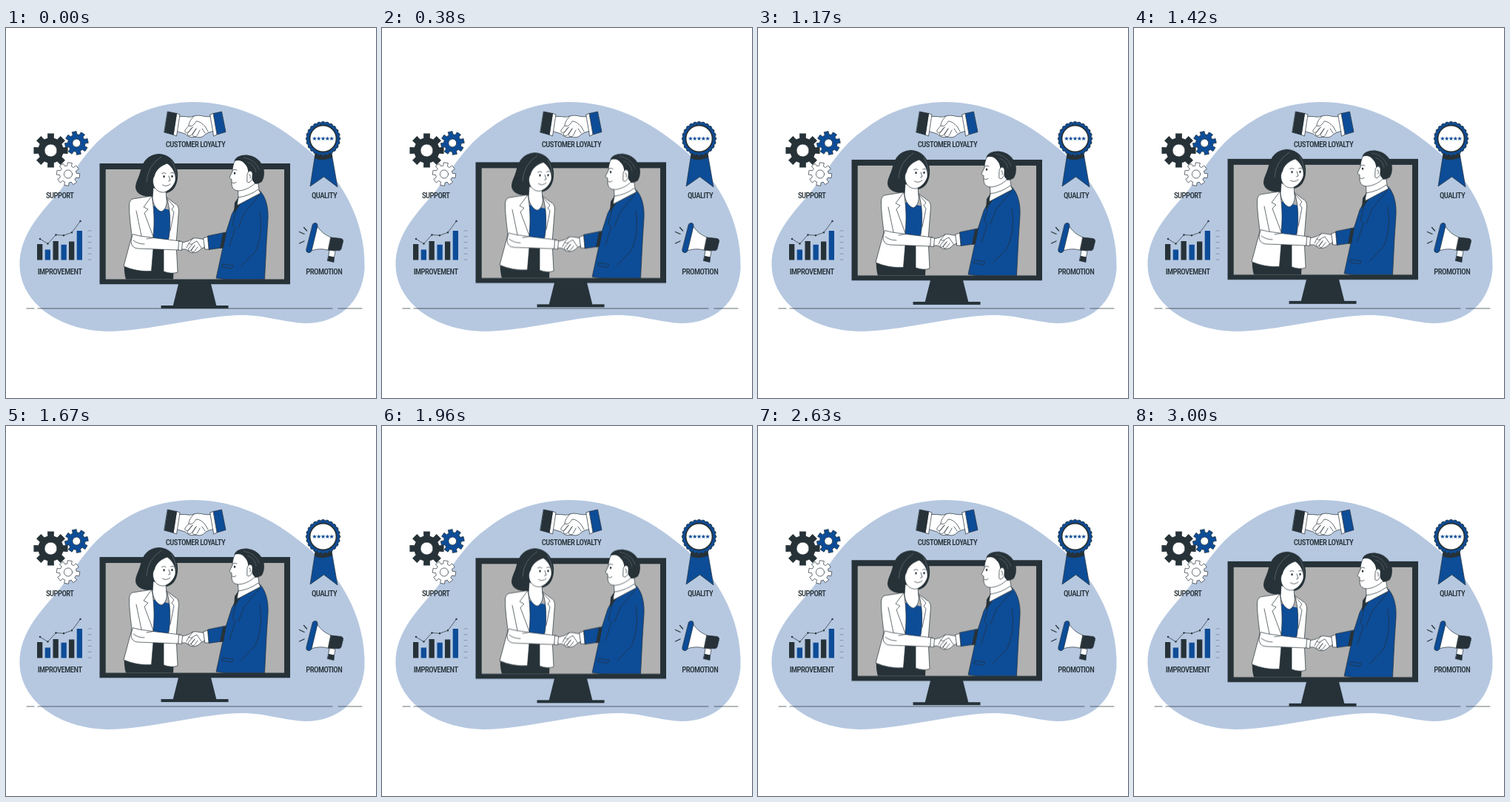
An HTML page that plays this animation: 500 px wide and 500 px high, repeating every 3040 ms.

```html
<!DOCTYPE html>
<html lang="en">
<head>
<meta charset="utf-8">
<title>Customer loyalty</title>
<style>
  html, body { margin: 0; width: 100%; height: 100%; overflow: hidden; background: #fff; }
  svg { display: block; width: 100vw; height: 100vh; }
  text {
    font: 500 10.6px "Roboto Condensed", "Liberation Sans Narrow", "Open Sans Condensed", Roboto, sans-serif;
    font-stretch: condensed;
    letter-spacing: -.5px;
    text-anchor: middle;
    fill: #263238;
  }
  .dark { fill: #263238; }
  .blue { fill: #0d4c97; }
  .white { fill: #fff; }
  .ink { stroke: #263238; stroke-width: .7; stroke-linecap: round; stroke-linejoin: round; }
  .line { fill: none; }
  .dot { stroke-width: 2.4; }
  .float { animation: float 3040ms linear infinite; }
  @keyframes float { 50% { transform: translateY(-6.6px); } }
</style>
</head>
<body>
<svg viewBox="0 0 500 500">
  <path fill="#b6c8e0" d="M252 100C310 100 360 124 405 162C450 198 487 258 484.500 326C481 372 448 399 405 399C375 398 352 388 318 388C270 388 190 410 138 410C70 409 20 370 18.500 322C17 276 53 245 75 217C96 189 112 159 144 137C176 112 210 101 252 100Z"/>
  <path class="ink line" d="M28 379H38M43 379H441M449 379H481"/>

  <!-- Gears are filled in by the script -->
  <g id="gears"></g>

  <!-- Chart -->
  <path class="dark" d="M42 292h7.300v21.500h-7.300zM63.500 288h7.300v25.500h-7.300zM85 288.500h7.300v25h-7.300z"/>
  <path class="blue" d="M52.700 299.500h7.300v14h-7.300zM74.500 292.800h7.300v20.700h-7.300zM95.700 274h7.300v39.500h-7.300z"/>
  <path class="ink line" d="M46 285L56.500 291.500L67.500 279.500L78 280.300L89 276.300L100.500 261"/>
  <path class="ink line dot" d="M46 285h0M56.500 291.500h0M67.500 279.500h0M78 280.300h0M89 276.300h0M100.500 261h0"/>
  <path fill="none" stroke="#7c8790" stroke-width=".8" d="M110.500 274h5M110.500 281.800h5M110.500 289.600h5M110.500 297.400h5M110.500 305.200h5M110.500 313h5"/>

  <!-- Small handshake -->
  <g class="ink">
    <path class="white" d="M233 120C242 118 248 122 254 119C263 116 270 122 278 119L283 139C277 140 273 141 269 144C265 149 259 148 255 147C250 149 245 146 242 143L229 139Z"/>
    <path class="line" d="M254 119C250 123 247 128 247 132C251 134 255 130 257 126C262 126 265 129 269 133L273 140M247 132L242 138C241 141 244 143 247 140L252 134M252 134L245 143C245 146 249 147 252 143L257 136M257 136L252 144C253 148 257 148 259 144L262 138M265 136L269 142"/>
    <path class="dark" d="M218.500 113L231 115.500L226.500 144.500L214 141Z"/>
    <path class="white" d="M231 115.500L235 117L230.500 146L226.500 144.500Z"/>
    <path class="blue" d="M280 115.500L291.500 113L297 140.500L285 144Z"/>
    <path class="white" d="M276 117L280 115.500L285 144L281 146Z"/>
  </g>

  <!-- Award -->
  <path class="blue ink" d="M418 169L411 214L429.500 201L448 215L440 169Z"/>
  <path class="dark" d="M418 169L417 176Q429 181 441 175L440 169Z"/>
  <g id="badge" transform="translate(428.500 149.500)"></g>

  <!-- Megaphone -->
  <g class="ink">
    <path class="white" d="M437.500 300L445 301.500L443.500 310L436 308.500Z"/>
    <path class="dark" d="M436 308.500L443.500 310L443 316.500L434.500 314.500Z"/>
    <path class="white" d="M419 265C424 275 432 280 439.500 283L436 300.500C428 298 419 298 410 302Z"/>
    <path class="dark" d="M439 283L453 284.500Q456 285.500 455.500 288.500L453 298.500Q452 301 449 300.800L435.500 300Z"/>
    <path class="blue" d="M414.500 265Q416 263 419 263.500Q421.500 264.500 421 268L413 301Q411.500 304.500 408 303.500Q405 302.500 405.800 299Z"/>
    <path class="line" stroke-width="1.300" d="M402.500 269.500L406.500 274M396.500 275.500L403 278.500M396.500 291L403 288"/>
  </g>

  <text x="256" y="160.900">CUSTOMER LOYALTY</text>
  <text x="72.700" y="230.200">SUPPORT</text>
  <text x="430" y="230.200">QUALITY</text>
  <text x="72.700" y="332.700">IMPROVEMENT</text>
  <text x="429.800" y="332.700">PROMOTION</text>

  <g class="float">
    <!-- Monitor -->
    <path class="dark" d="M126.500 182.900H384V346.300H126.500ZM233 346H277L284.500 376H225.500ZM209.500 374.900H300.500V379H209.500Z"/>
    <path fill="#b1b1b1" d="M134.700 191H376V339.600H134.700Z"/>

    <!-- Woman -->
    <path class="dark" d="M160 318L198 296L228 296L226 339.600H162Q159 330 160 318Z"/>
    <path class="blue" d="M197 240L222 246L222 288H199Z"/>
    <path class="dark" d="M206 170C192 171 185 180 182 192C179 204 175 208 175 216C176 225 187 228.500 200 228.500L220 222C227 219 230 213 231.500 206C235 190 226 170 206 170Z"/>
    <g class="ink">
      <path class="white" d="M199 216L198 230C199 240 205 247 210 248C215 246 218 239 217 232L216 220Z"/>
      <path class="white" d="M218 183C209 186 202 192 200.500 200C198 203 198 209 200 214C203 220 208 222.500 214 222C222 219 227 213 229 206C230 196 225 188 218 183Z"/>
      <path class="line" d="M210.500 196.500Q213.500 194.500 216 196.500M222.500 196Q225 194.500 227 196M220 200L222 206L219.500 207M211.500 212Q216.500 215.500 222 211"/>
      <path class="line dot" d="M213.500 200.500v.500M224.500 200.200v.500"/>
      <path class="line" stroke="#68717a" d="M210 174Q191 186 190 208M224 180Q230 190 230 201"/>
      <path class="white" d="M197 227L171 231Q166.500 233 166.500 240C166.500 256 169 270 170 281L159 322Q178 330 196.500 328.500L199 298V280C201 263 200 243 197 227Z"/>
      <path class="white" d="M217 229C222 242 223 266 220 284L213 300V329Q224 333 232 330L230 291L233.500 246Q233 239 228 237Z"/>
      <path class="line" d="M197 227L186 242L192 245L187 250L199 282M218 231L227 241L224 245L227 249L222 274"/>
      <path class="white" d="M171 279L169 288Q169 297 178 298L233 300L236 288L199 283.500L181 281Z"/>
      <path class="line" d="M176 247L183 281M199 283.500L190 285M172 287Q178 292 187 292"/>
    </g>

    <!-- Man -->
    <path class="blue ink" d="M344 221L313 237L305 252L297 277L292 301L284 338Q294 340 305 339.600H349.500L352 290L354 259C355 244 351.500 229 344 221Z"/>
    <path class="dark" d="M314 229L309 236L308 250L317 238Z"/>
    <g class="ink">
      <path class="white" d="M313 211L314 229L312 239L343 224L340 206Z"/>
      <path class="white" d="M310 178C307 184 306 189 306 194L302 202Q302 204 305 204.500L305 210C305 217 309 220 315 220C325 219 333 214 339 207L337 181L322 175Z"/>
      <path class="white" d="M314 229L312 240L344 223L341 218Q329 227 314 229Z"/>
    </g>
    <path class="dark" d="M308.500 180C310 173 321 170.500 328 172C338 173.500 344 180 347.500 187C350 195 349 203 345.500 208Q341 211 337 211L333 206L333 197L329.500 194L327 200C328 191 326 187 322 183C319 179 314 178 308.500 180Z"/>
    <path fill="none" stroke="#68717a" stroke-width=".600" d="M321 175Q338 178 342 192M326 181Q336 184 338 195"/>
    <g class="ink">
      <path class="white" d="M326 198C327 191 334 192 333 199C333 206 329 211 326 208Z"/>
      <path class="line" d="M328.500 198Q331 197 330 203M306.500 192Q309 190 312 192M305.500 209Q308 211 311 208.500"/>
      <path class="line dot" d="M309 196v.500"/>
      <path class="line" d="M313 238L306 266L310 270L302 295M343 225L322 250L314 270M343 248C346 270 344 286 337 302L318 322M293 319L307 321L305 325L292 323Z"/>
      <path class="blue" d="M297 276L272.500 281L274 299.500L292 297Z"/>
    </g>
    <path class="dark" d="M293 277.500L297.500 277L294 297L289 298Z"/>

    <!-- Clasped hands -->
    <g class="ink">
      <path class="white" d="M238 290L246 288L253 284C259 283 263 286 268 285L269 296L264 298C260 303 254 305 249 303L243 299L237 299Z"/>
      <path class="line" d="M253 284L247 291Q249 294 254 290L258 288L264 297M247 291L244 297M252 292L246 299Q247 303 250 300L255 294M255 294L250 301Q253 305 256 300L259 296"/>
      <path class="white" d="M234 288L238.500 289L237.500 300.500L233 300Z"/>
      <path class="white" d="M267 284L272.500 282L274 299L269 299Z"/>
    </g>
  </g>
</svg>
<script>
  const ns = "http://www.w3.org/2000/svg";

  function add(parent, tag, attrs) {
    const node = document.createElementNS(ns, tag);
    for (const key in attrs) node.setAttribute(key, attrs[key]);
    parent.append(node);
  }

  const polar = (x, y, r, a) =>
    `${(x + r * Math.cos(a)).toFixed(2)} ${(y + r * Math.sin(a)).toFixed(2)}`;

  function gear(x, y, outer, inner, hole, cls, turn) {
    const points = [];
    for (let i = 0; i < 8; i++) {
      const a = turn + i * Math.PI / 4;
      points.push(polar(x, y, inner, a - .25), polar(x, y, outer, a - .19),
        polar(x, y, outer, a + .19), polar(x, y, inner, a + .25));
    }
    const parent = document.getElementById("gears");
    add(parent, "path", { d: `M${points.join("L")}Z`, class: cls });
    add(parent, "circle", { cx: x, cy: y, r: hole, class: "white ink" });
  }

  gear(60.5, 165.5, 23.5, 17.3, 8.5, "dark", 0);
  gear(95.3, 155.5, 16, 11.8, 5.4, "blue ink", -.2);
  gear(84, 197.5, 15.8, 11.5, 5.6, "white ink", .15);

  const badge = document.getElementById("badge");
  for (let i = 0; i < 24; i++) {
    const [cx, cy] = polar(0, 0, 20.3, i * Math.PI / 12).split(" ");
    add(badge, "circle", { cx, cy, r: 2.9, class: "blue ink" });
  }
  add(badge, "circle", { r: 20.8, class: "blue" });
  add(badge, "circle", { r: 18, class: "white ink", style: "stroke-width:1.8" });

  for (let i = -2; i <= 2; i++) {
    const star = Array.from({ length: 10 }, (_, k) =>
      polar(i * 5.8, 0, k % 2 ? 1.3 : 3.1, k * Math.PI / 5 - Math.PI / 2));
    add(badge, "path", { d: `M${star.join("L")}Z`, class: "blue" });
  }
</script>
</body>
</html>
```
